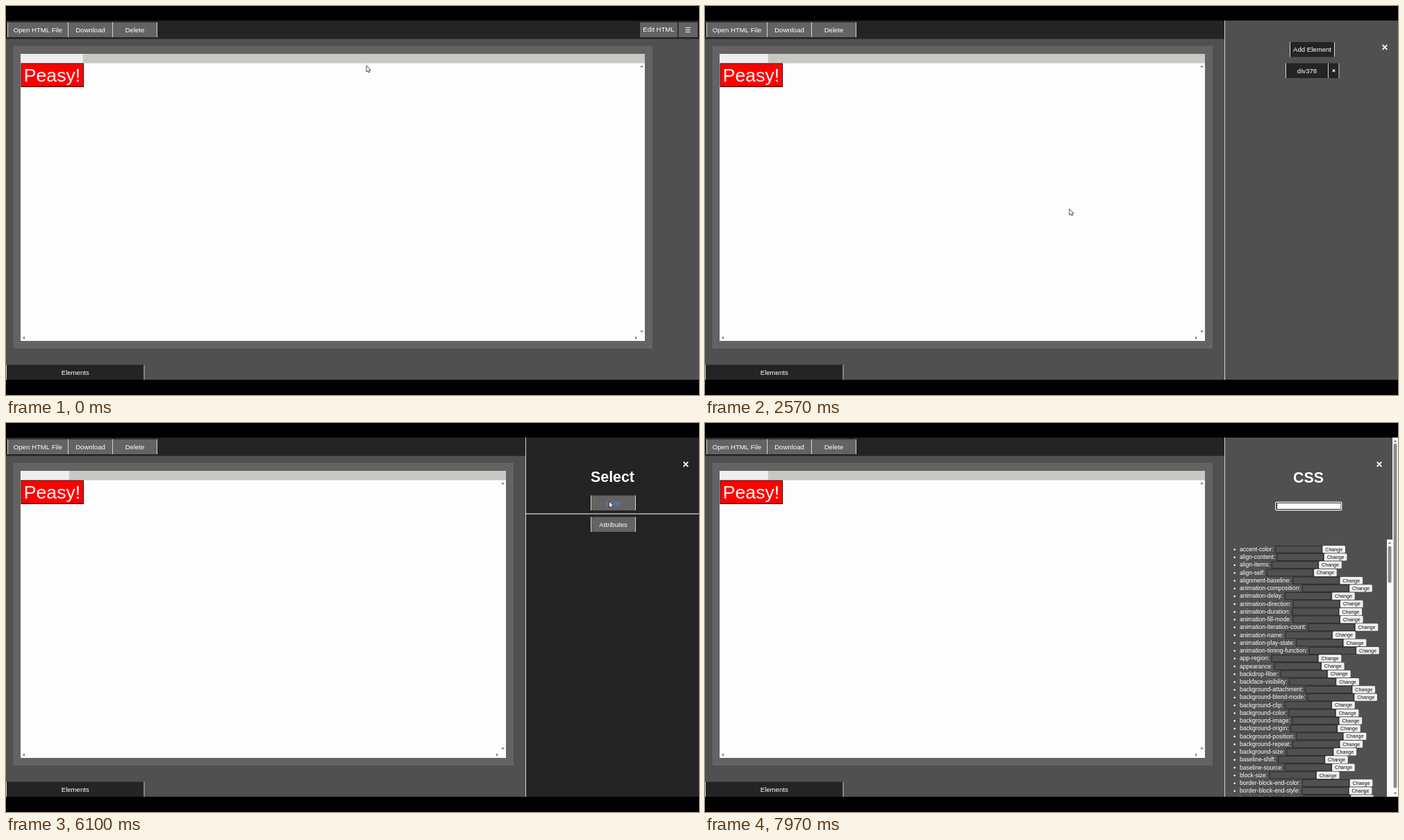
Write an HTML page with a canvas that moves like this. It is 998 px wide and 561 px high and loops after 8000 ms.

```html
<!DOCTYPE html>
<html lang="en">
<head>
<meta charset="utf-8">
<title>HTML editor</title>
<style>
html, body { margin: 0; width: 100%; height: 100%; overflow: hidden; background: #000; }
canvas { display: block; }
</style>
</head>
<body>
<canvas width="998" height="561"></canvas>
<script>
const LOOP = 8000, TOP = 21, BOTTOM = 539, HEIGHT = BOTTOM - TOP;
const GRAY = '#505050', DARK = '#242424', MID = '#636363', LIGHT = '#d4d4d4', BLUE = '#3b8eff';
const c = document.querySelector('canvas').getContext('2d');

const properties = `accent-color align-content align-items align-self alignment-baseline
animation-composition animation-delay animation-direction animation-duration animation-fill-mode
animation-iteration-count animation-name animation-play-state animation-timing-function app-region
appearance backdrop-filter backface-visibility background-attachment background-blend-mode
background-clip background-color background-image background-origin background-position
background-repeat background-size baseline-shift baseline-source block-size
border-block-end-color border-block-end-style border-block-end-width`.split(/\s+/);

// pointer path: time, x, y
const path = [[0, 519, 86], [430, 519, 86], [1450, 61, 521], [2110, 61, 521], [2570, 524, 293],
  [2930, 800, 150], [3350, 869, 97], [4630, 870, 97], [5070, 868.5, 113], [LOOP, 868.5, 113]];

function pointerAt(t) {
  const i = path.findIndex(k => k[0] > t);
  const [t0, x0, y0] = path[i - 1], [t1, x1, y1] = path[i];
  const p = (t - t0) / (t1 - t0);
  return { x: x0 + (x1 - x0) * p, y: y0 + (y1 - y0) * p };
}

// CSS "ease" over half a second
function ease(t, start) {
  const x = Math.min(1, Math.max(0, (t - start) / 500));
  if (x === 0 || x === 1) return x;
  const bezier = (a, b, u) => 3 * a * u * (1 - u) ** 2 + 3 * b * u * u * (1 - u) + u ** 3;
  let lo = 0, hi = 1;
  for (let i = 0; i < 25; i++) {
    const mid = (lo + hi) / 2;
    if (bezier(.25, .25, mid) < x) lo = mid; else hi = mid;
  }
  return bezier(.1, 1, lo);
}

function box(x, y, w, h, color) {
  c.fillStyle = color;
  c.fillRect(x, y, w, h);
}

function pill(x, y, w, h, r, color) {
  c.fillStyle = color;
  c.beginPath();
  c.roundRect(x, y, w, h, r);
  c.fill();
}

function text(s, x, y, size = 9.6, color = '#fff', align = 'center', weight = '') {
  c.font = `${weight} ${size}px Arial, "Liberation Sans", sans-serif`;
  c.textAlign = align;
  c.fillStyle = color;
  c.fillText(s, x, y + size * .355);
}

function button(s, x, y, w, h, fill, color) {
  box(x, y, w, h, fill);
  box(x, y, 1, h, LIGHT);
  box(x + w - 1, y, 1, h, LIGHT);
  text(s, x + w / 2, y + h / 2, 9.6, color);
}

function cross(x, y, r = 3.3, width = 1.9) {
  c.strokeStyle = '#fff';
  c.lineWidth = width;
  c.beginPath();
  for (const s of [-1, 1]) {
    c.moveTo(x - r, y - r * s);
    c.lineTo(x + r, y + r * s);
  }
  c.stroke();
}

function arrow(x, y, turns) {
  c.save();
  c.translate(x, y);
  c.rotate(turns * Math.PI / 2);
  c.fillStyle = '#777';
  c.beginPath();
  c.moveTo(-2.4, 1.3);
  c.lineTo(0, -1.4);
  c.lineTo(2.4, 1.3);
  c.fill();
  c.restore();
}

function toolbar() {
  box(0, TOP, 998, 26.5, DARK);
  button('Open HTML File', 2, 23.5, 88, 21.5, MID);
  button('Download', 89, 23.5, 65, 21.5, MID);
  button('Delete', 153, 23.5, 65, 21.5, MID);
  box(913, 23.5, 54, 21.5, MID);
  text('Edit HTML', 940, 34);
  box(968.5, 23.5, 27.5, 21.5, MID);
  for (const y of [31, 34, 37]) box(978.5, y, 7, 1, '#fff');
}

function editor(right) {
  const w = right - 21;
  box(10.5, 57.5, w + 21.5, 436.5, MID);
  box(21, 69, w, 414, '#fdfdfd');
  box(21, 69, w, 13.5, '#c8c8c5');
  box(21, 69, w / 10, 13.5, '#eee');
  arrow(right - 4.5, 87, 0);
  arrow(right - 4.5, 469.5, 2);
  arrow(25.5, 478.5, 3);
  arrow(right - 12.5, 478.5, 1);
  box(21.5, 82.5, 90.5, 34.5, '#300');
  box(22.5, 83.5, 88.5, 32.5, '#f00');
  text('Peasy!', 66.5, 99.5, 26.67);
}

// A panel growing from the bottom; body gets the distance still to rise
function panel(p, color, body) {
  if (!p) return;
  const d = HEIGHT * (1 - p);
  c.save();
  c.beginPath();
  c.rect(748, TOP + d, 250, HEIGHT - d);
  c.clip();
  box(748, TOP, 250, HEIGHT, color);
  box(748, TOP, 1, HEIGHT, LIGHT);
  body(d, d + Math.min(1, d / 8));
  c.restore();
}

function elementsPanel(d, shift, hover) {
  cross(979, 59.5 + d * .953);
  button('Add Element', 842, 52 + shift, 65, 21.5, DARK);
  button('div378', 836, 82.5 + shift, 62, 21.5, DARK, hover ? BLUE : '#fff');
  box(898, 82.5 + shift, 15.5, 21.5, DARK);
  box(912.5, 82.5 + shift, 1, 21.5, LIGHT);
  cross(905.5, 93.2 + shift, 1.8, 1.1);
}

function selectPanel(d, shift, hover) {
  cross(979, 59.5 + d);
  text('Select', 873.5, 77.5 + shift, 21.33, '#fff', 'center', 'bold');
  button('Style', 842, 104.5 + shift, 65, 21.5, MID, hover ? BLUE : '#fff');
  box(748, 130.5 + shift, 250, 1, '#fff');
  button('Attributes', 842, 135.5 + shift, 65, 21.5, MID);
}

function propertyRow(name, y) {
  c.fillStyle = '#fff';
  c.beginPath();
  c.arc(762.7, y + .5, 1.3, 0, 7);
  c.fill();
  text(name + ':', 770, y, 8.53, '#fff', 'left');
  const x = 770 + c.measureText(name + ': ').width;
  c.strokeStyle = '#2b2b2b';
  c.lineWidth = 1;
  c.strokeRect(x + .5, y - 4.8, 66.5, 10);
  pill(x + 68.3, y - 5, 32.6, 10.3, 1.5, '#efefef');
  text('Change', x + 84.6, y + .2, 7.11, '#111');
}

function cssPanel(d, shift, focused) {
  cross(971, 59.5 + d * .955);
  text('CSS', 869, 78 + shift, 21.33, '#fff', 'center', 'bold');
  if (focused) {
    pill(821.3, 113.5 + shift, 96, 12.7, 2, '#fff');
    pill(822.5, 114.7 + shift, 93.6, 10.3, 1, '#111');
    box(824, 115.7 + shift, 91.5, 8.3, '#fff');
  } else {
    box(822.3, 114.3 + shift, 94, 10.7, '#fff');
  }
  const list = 168 + d * .957;
  properties.forEach((name, i) => propertyRow(name, list + 14 + i * 11.235));
  box(982, list, 8, BOTTOM - list, '#fcfcfc');
  arrow(986, list + 5, 0);
  pill(983.5, list + 9.5, 5, 53 * (1 - d / HEIGHT) ** 2, 2.5, '#8b8b8b');
  box(990, TOP + d, 8, HEIGHT - d, '#fcfcfc');
  arrow(994, TOP + d + 5, 0);
  arrow(994, BOTTOM - 5, 2);
  pill(991.5, TOP + d + 8.5, 5, Math.max(5, HEIGHT - d - 21), 2.5, '#8b8b8b');
}

function pointer({ x, y }) {
  c.beginPath();
  [[0, 0], [0, 9], [2, 7.2], [3.4, 10], [4.9, 9.3], [3.6, 6.7], [6.3, 6.5]]
    .forEach(([dx, dy]) => c.lineTo(x + dx, y + dy));
  c.closePath();
  c.fillStyle = '#fff';
  c.strokeStyle = '#222';
  c.lineWidth = .8;
  c.fill();
  c.stroke();
}

function draw(t) {
  const at = pointerAt(t);
  const over = (x, y, w, h) => at.x >= x && at.x < x + w && at.y >= y && at.y < y + h;

  box(0, 0, 998, 561, GRAY);
  toolbar();
  editor(920 - 200 * ease(t, 1567));
  button('Elements', 0, 517.5, 199.5, 21.5, DARK, over(0, 517, 200, 22) ? BLUE : '#fff');
  panel(ease(t, 1572), GRAY, (d, s) => elementsPanel(d, s, over(836, 82, 62, 22)));
  panel(ease(t, 3595), DARK, (d, s) => selectPanel(d, s, over(842, 104, 65, 22)));
  panel(ease(t, 6640), GRAY, (d, s) => cssPanel(d, s, t >= 7400));
  box(0, 0, 998, TOP, '#000');
  box(0, BOTTOM, 998, 22, '#000');
  if (t < 7230) pointer(at);
}

function frame() {
  draw(performance.now() % LOOP);
  requestAnimationFrame(frame);
}
frame();
</script>
</body>
</html>
```
